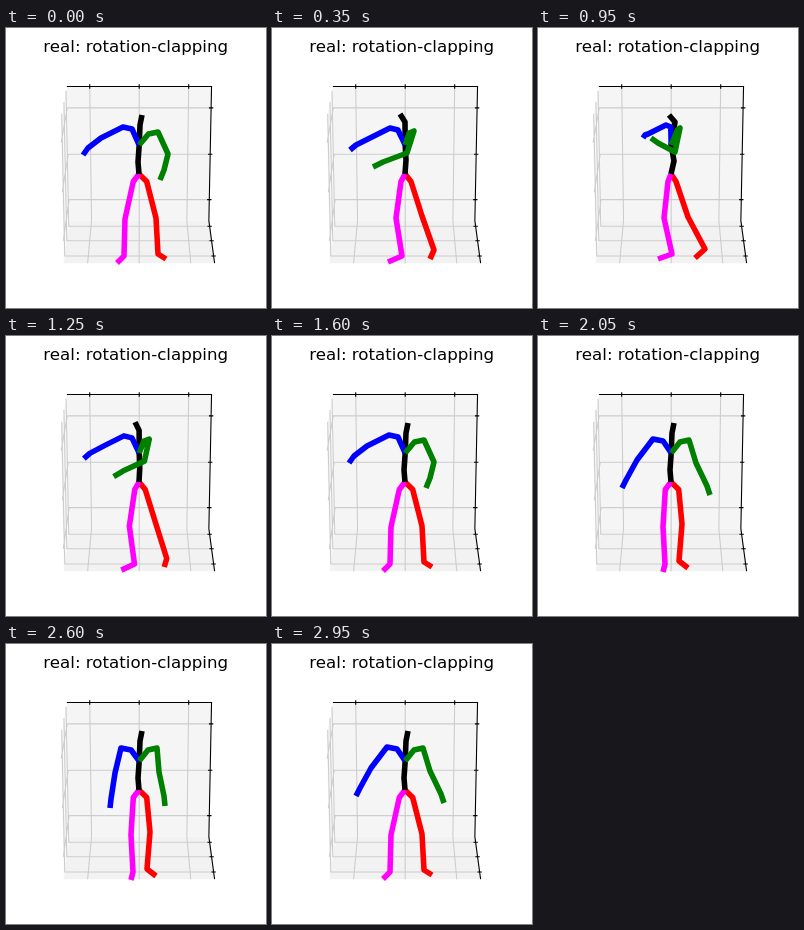
An HTML page for the animation above (3000 ms loop, 260 by 280 pixels).

```html
<!DOCTYPE html>
<html lang="en">
<head>
<meta charset="utf-8">
<title>Skeleton motion plot</title>
<style>
  html, body { margin: 0; width: 100%; height: 100%; overflow: hidden; background: #fff; }
  svg { display: block; }
  path { fill: none; stroke-width: 1.1; }
  text { font: 16.67px "DejaVu Sans", sans-serif; text-anchor: middle; }
  .limb { stroke-width: 5.56; stroke-linejoin: round; }
</style>
</head>
<body>
<svg width="260" height="280" viewBox="0 0 260 280">
  <text x="129.7" y="24">real: rotation-clapping</text>
</svg>
<script>
const LOOP = 3000, STEP = 50;
const svg = document.querySelector('svg');

function addPath(attrs) {
  const el = document.createElementNS('http://www.w3.org/2000/svg', 'path');
  for (const name in attrs) el.setAttribute(name, attrs[name]);
  return svg.appendChild(el);
}
const line = points => 'M' + points.map(p => p.join()).join('L');

// Perspective box, seen from an elevation of 110 degrees
const X = 0.5715, Y = 0.5715, Z = 0.4286;
const SIN = Math.sin(Math.PI / 9), COS = Math.cos(Math.PI / 9);
function project([x, y, z]) {
  const scale = 1292 / (10 - SIN * y - COS * z);
  return [133.2 + x * scale, 145 - (COS * y - SIN * z) * scale];
}
const edge = (...corners) => line(corners.map(project));

const pane = (fill, ...corners) => addPath({ d: edge(...corners) + 'Z', style: 'fill:' + fill });
pane('#f8f8f8', [-X, Y, -Z], [-X, Y, Z], [-X, -Y, Z], [-X, -Y, -Z]);
pane('#f2f2f2', [-X, -Y, -Z], [X, -Y, -Z], [X, -Y, Z], [-X, -Y, Z]);
pane('#f5f5f5', [-X, Y, -Z], [X, Y, -Z], [X, -Y, -Z], [-X, -Y, -Z]);

const ticks = (middle, gap) => [middle - gap, middle, middle + gap];
const xTicks = ticks(0, 0.391), yTicks = ticks(0.004, 0.391), zTicks = ticks(-0.007, 0.3);
const grid = [
  ...xTicks.map(x => edge([x, Y, -Z], [x, -Y, -Z], [x, -Y, Z])),
  ...yTicks.map(y => edge([X, y, -Z], [-X, y, -Z], [-X, y, Z])),
  ...zTicks.map(z => edge([-X, Y, z], [-X, -Y, z], [X, -Y, z]))
];
addPath({ d: grid.join(''), stroke: '#cdcdcd' });

function tickMark(point, dx, dy) {
  const [x, y] = project(point);
  return line([[x - dx, y - dy], [x + dx, y + dy]]);
}
const axes = [
  edge([-X, Y, -Z], [X, Y, -Z], [X, -Y, -Z], [X, -Y, Z]),
  ...xTicks.map(x => tickMark([x, Y, -Z], 0, 2.2)),
  ...yTicks.map(y => tickMark([X, y, -Z], 2.2, 0)),
  ...zTicks.map(z => tickMark([X, -Y, z], 2.2, 0))
];
addPath({ d: axes.join(''), stroke: '#000' });

// Key poses. torso: waist, neck, head; legs: knee, ankle, toe;
// arms: shoulder, elbow, wrist, hand; hips: half width
const open = {
  hips: [6.7],
  torso: [132, 134, 134, 97, 136, 87],
  rightLeg: [119, 191, 118, 228, 111, 235],
  leftLeg: [150, 190, 152, 226, 160, 231],
  rightArm: [117, 99, 95, 110, 82, 120, 77, 127],
  leftArm: [152, 104, 162, 126, 158, 142, 154, 152]
};
const turned = {
  hips: [5],
  torso: [134, 132, 133, 94, 128, 86],
  rightLeg: [124, 190, 130, 228, 116, 234],
  leftLeg: [150, 188, 162, 222, 158, 231],
  rightArm: [118, 100, 100, 109, 84, 117, 78, 122],
  leftArm: [142, 103, 135, 125, 111, 134, 101, 139]
};
const clap = {
  hips: [4],
  torso: [136, 133, 137, 94, 131, 87],
  rightLeg: [126, 190, 134, 226, 120, 231],
  leftLeg: [150, 189, 167, 221, 157, 230],
  rightArm: [128, 97, 110, 106, 107, 107, 105, 110],
  leftArm: [142, 100, 137, 124, 120, 115, 113, 110]
};
const lowered = {
  ...open,
  rightLeg: [125, 191, 127, 228, 125, 236],
  leftLeg: [144, 188, 141, 225, 150, 232],
  rightArm: [115, 104, 109, 129, 105, 155, 104, 164],
  leftArm: [151, 104, 153, 128, 158, 152, 159, 162]
};
const spread = {
  rightArm: [115, 103, 99, 124, 88, 144, 84, 152],
  leftArm: [151, 104, 158, 127, 169, 150, 172, 159]
};
const timeline = [
  [0, open], [350, turned], [600, turned], [950, clap], [1150, turned], [1600, open],
  [2050, { ...lowered, ...spread }], [2300, lowered], [2700, lowered],
  [2950, { ...open, ...spread }]
];

const mix = (a, b, u) => a + (b - a) * u;
const ease = u => u * u * (3 - 2 * u);

function poseAt(t) {
  const next = Math.max(1, timeline.findIndex(([time]) => time >= t));
  const [t0, from] = timeline[next - 1], [t1, to] = timeline[next];
  const u = ease((t - t0) / (t1 - t0));
  const pose = {};
  for (const part in from) pose[part] = from[part].map((v, i) => mix(v, to[part][i], u));
  return pose;
}

const pelvis = [133, 146], chest = [133.2, 117];

function joints({ hips: [hip], torso, rightLeg, leftLeg, rightArm, leftArm }) {
  const collar = arm => [mix(torso[2], arm[0], 0.47), arm[1] + 2];
  return [
    [...pelvis, 134 + hip, 153.5, ...leftLeg],
    [...pelvis, 134 - hip, 153.5, ...rightLeg],
    [...pelvis, ...torso.slice(0, 2), ...chest, ...torso.slice(2)],
    [...chest, ...collar(rightArm), ...rightArm],
    [...chest, ...collar(leftArm), ...leftArm]
  ];
}

const limbs = ['#f00', '#f0f', '#000', '#00f', '#008000']
  .map(stroke => addPath({ stroke, class: 'limb' }));

const start = performance.now();
function draw() {
  const t = Math.floor((performance.now() - start) % LOOP / STEP) * STEP;
  joints(poseAt(t)).forEach((points, i) =>
    limbs[i].setAttribute('d', 'M' + points.map(v => v.toFixed(2)).join(' ')));
  requestAnimationFrame(draw);
}
draw();
</script>
</body>
</html>
```
